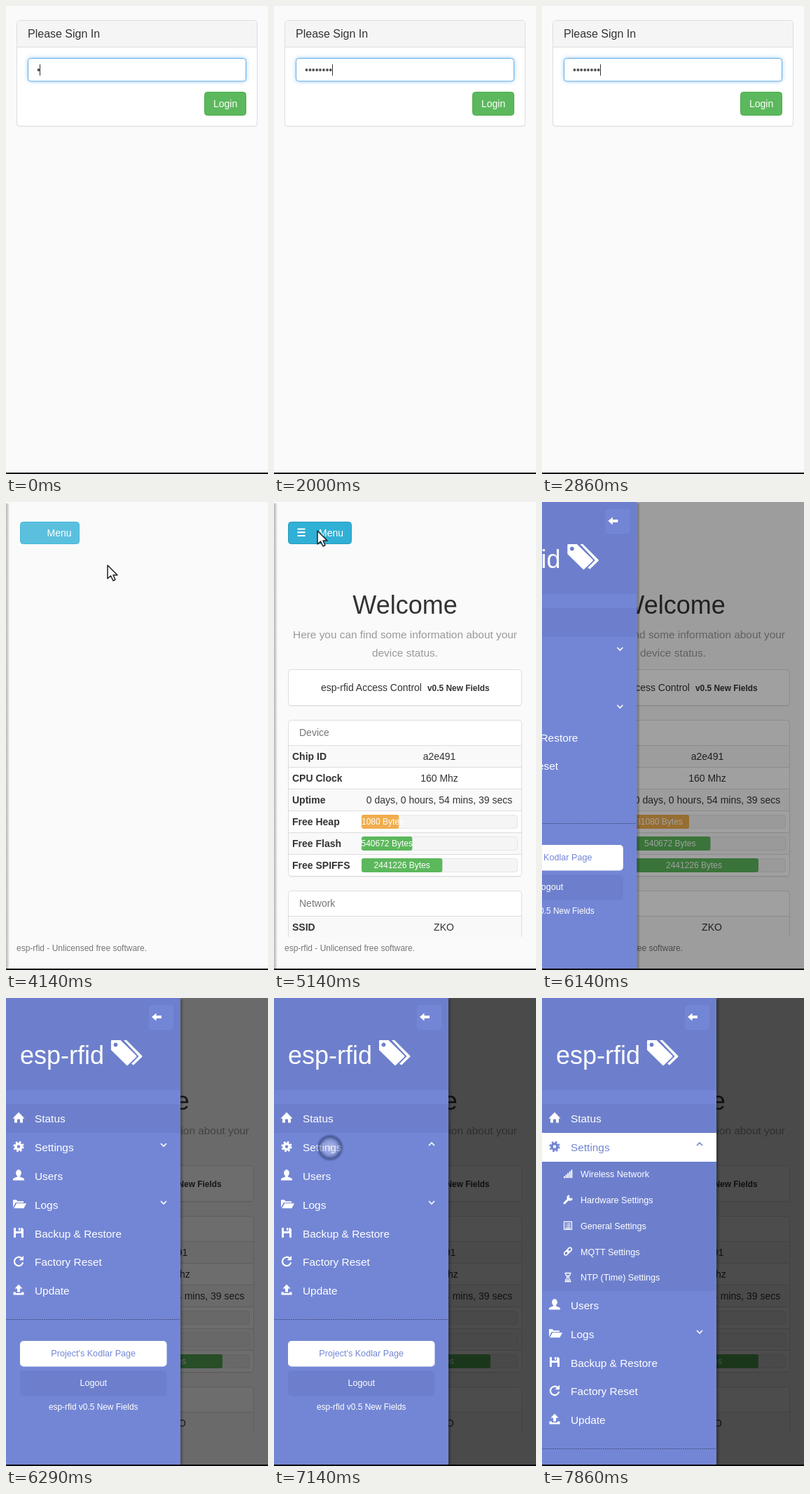
Recreate the animation shown at these times as an HTML page. Size 374 by 666 pixels, loop 8 s.

```html
<!DOCTYPE html>
<html lang="en">
<head>
<meta charset="utf-8">
<title>Device panel</title>
<style>
html, body { margin: 0; width: 100%; height: 100%; overflow: hidden; background: #fafafa; }
svg { display: block; }
text { font-family: "Liberation Sans", Arial, sans-serif; white-space: pre; }
</style>
</head>
<body>
<svg id="stage" width="374" height="666" viewBox="0 0 374 666"></svg>
<script>
const LOOP = 8000, FPS = 7;
const BLUE = '#7386d5', DEEP = '#6d7fcc', GREEN = '#5cb85c';
const SIDE_W = 249, SUB_H = 184;

const text = (x, y, size, str, fill = '#333', extra = '') =>
  `<text x="${x}" y="${y}" font-size="${size}" fill="${fill}" ${extra}>${str}</text>`;
const mid = (x, y, size, str, fill, extra = '') =>
  text(x, y, size, str, fill, 'text-anchor="middle" ' + extra);
const rect = (x, y, w, h, fill, extra = '') =>
  `<rect x="${x}" y="${y}" width="${w}" height="${h}" fill="${fill}" ${extra}/>`;
const path = (d, extra = '') => `<path d="${d}" ${extra}/>`;
const line = (d, w, extra = '') =>
  path(d, `fill="none" stroke="currentColor" stroke-width="${w}" ${extra}`);
const at = (x, y, body, extra = '') => `<g transform="translate(${x} ${y})" ${extra}>${body}</g>`;
const BOLD = 'font-weight="bold"';

// Icons are drawn around their own centre in the current colour.
const icons = {
  home: path('M-8.5 1 L0 -8 L8.5 1 H6 V7 H2 V2 H-2 V7 H-6 V1Z'),
  gear: '<circle r="4" fill="none" stroke="currentColor" stroke-width="3.6"/>' +
    '<circle r="6.4" fill="none" stroke="currentColor" stroke-width="2.6" stroke-dasharray="2.6 2.43"/>',
  user: '<ellipse cy="-3.5" rx="3.9" ry="4.6"/>' +
    path('M-8 7 V5 Q-7 3.5 -2 2 V0 H2 V2 Q7 3.5 8 5 V7Z'),
  folder: path('M-8 5 V-6 H-3 L-1.5 -4 H7 V-2 H-4.5Z M-6.8 6 L-3 -1 H11 L7.4 6Z'),
  save: path('M-7 -7 H-4 V-2 H3 V-7 H5 L7 -5 V7 H4 V1 H-4 V7 H-7Z M0 -7 H2 V-3 H0Z'),
  redo: line('M4.6 -4.2 A6.2 6.2 0 1 0 6.2 1.5', 2.2) + path('M7 -8 V-1.5 H0.8Z'),
  upload: path('M0 -8 L5.5 -2 H2 V3 H-2 V-2 H-5.5Z M-7.5 3 H-4 V4.5 H4 V3 H7.5 V7 H-7.5Z'),
  signal: [0, 1, 2, 3, 4].map(i => rect(-6 + i * 2.6, 3.5 - i * 2.3, 1.9, 2.5 + i * 2.3, 'currentColor')).join(''),
  wrench: line('M-5 5 L2 -2', 3, 'stroke-linecap="round"') +
    line('M5.6 -2.2 A3 3 0 1 1 2.2 -5.6', 2.4),
  list: line('M-5.5 -5.5 H5.5 V5.5 H-5.5Z', 1.2) +
    line('M-3.6 -2.8 H-2.4 M-1.4 -2.8 H3.8 M-3.6 -.4 H-2.4 M-1.4 -.4 H3.8 M-3.6 2 H-2.4 M-1.4 2 H3.8 M-3.6 4 H3.8', 1.2),
  link: `<g transform="rotate(-45)" fill="none" stroke="currentColor" stroke-width="1.7">
    <rect x="-6.6" y="-2.3" width="7.6" height="4.6" rx="2.3"/>
    <rect x="-1" y="-2.3" width="7.6" height="4.6" rx="2.3"/></g>`,
  glass: line('M-4.5 -6 H4.5 M-4.5 6 H4.5', 1.5) +
    line('M-3.2 -6 V-3.5 L-.6 0 L-3.2 3.5 V6 M3.2 -6 V-3.5 L.6 0 L3.2 3.5 V6', 1.2) +
    path('M-2.4 5 L0 2 L2.4 5Z M-1.8 -3 H1.8 L0 -.6Z')
};

const chevron = (y, up) =>
  line(up ? `M221 ${y + 2} L225 ${y - 2} L229 ${y + 2}` : `M221 ${y - 2} L225 ${y + 2} L229 ${y - 2}`, 1.6);
const item = (y, icon, label) =>
  at(18, y - 1, icons[icon], 'fill="currentColor"') + text(41, y + 5.5, 15.4, label, 'currentColor');
const subItem = (y, icon, label) =>
  at(37, y - .5, icons[icon], 'fill="currentColor"') + text(55, y + 4.5, 12.6, label, '#fff');

const login = `
  ${rect(15.5, 21.5, 343, 150.5, '#000', 'rx="4" opacity=".06"')}
  ${rect(15.5, 20.5, 343, 150.5, '#fff', 'rx="4" stroke="#ddd"')}
  ${path('M16 58 V24 Q16 21 19 21 H355 Q358 21 358 24 V58Z', 'fill="#f5f5f5"')}
  ${rect(16, 58, 342, 1, '#ddd')}
  ${text(31, 45, 16, 'Please Sign In')}
  ${rect(31.5, 74.5, 311, 32.5, '#66afe9', 'rx="4" filter="url(#glow)" opacity=".75"')}
  ${rect(31.5, 74.5, 311, 32.5, '#fff', 'rx="4" stroke="#66afe9"')}
  ${text(44, 95.5, 14, '', '#555', 'id="dots"')}
  ${rect(0, 83, 1, 16, '#333', 'id="caret"')}
  ${rect(283.5, 122.5, 59, 33, GREEN, 'rx="4" stroke="#4cae4c"')}
  ${text(296, 144, 14, 'Login', '#fff')}`;

const panel = (y, h) => rect(20.5, y + .5, 333, h, '#fff', 'rx="4" stroke="#ddd"') +
  rect(22, y + h + 1, 330, 1, '#000', 'opacity=".05"');
const rowAt = (y, i, label, value, cx = 236) =>
  (i % 2 ? '' : rect(21, y, 332, 31, '#f9f9f9')) + rect(21, y, 332, 1, '#ddd') +
  text(26, y + 21, 14, label, '#333', BOLD) + mid(cx, y + 21, 14, value, '#333');

const bars = [
  { label: 'Free Heap', value: '31080 Bytes', w: 85, fill: '#f0ad4e' },
  { label: 'Free Flash', value: '540672 Bytes', w: 115.5, fill: GREEN },
  { label: 'Free SPIFFS', value: '2441226 Bytes', w: 184, fill: GREEN }
];
const barRow = (b, i) => {
  const y = 439 + i * 31;
  return rowAt(y, i + 3, b.label, '') +
    rect(125, y + 6, 223, 20, '#f5f5f5', 'rx="4"') +
    rect(125.5, y + 6.5, 222, 19, 'none', 'rx="4" stroke="#e6e6e6"') +
    `<svg x="125" y="${y + 6}" width="223" height="20">` +
    rect(0, 0, 0, 20, b.fill, `rx="3" id="bar${i}"`) +
    mid(0, 14, 12, b.value, '#fff', `id="cap${i}"`) + '</svg>';
};

const content = `
  ${mid(187, 159, 36, 'Welcome', '#333')}
  ${mid(187, 194, 15.4, 'Here you can find some information about your', '#999')}
  ${mid(187, 220, 15.4, 'device status.', '#999')}
  ${panel(238, 51)}
  ${text(67, 269, 14, 'esp-rfid Access Control')}
  ${text(219, 269, 11.9, 'v0.5 New Fields', '#333', BOLD)}
  ${panel(310, 222)}
  ${text(36, 333, 14, 'Device', '#777')}
  ${rowAt(346, 0, 'Chip ID', 'a2e491')}
  ${rowAt(377, 1, 'CPU Clock', '160 Mhz')}
  ${rowAt(408, 2, 'Uptime', '0 days, 0 hours, 54 mins, 39 secs')}
  ${bars.map(barRow).join('')}
  ${panel(553, 200)}
  ${text(36, 576, 14, 'Network', '#777')}
  ${rowAt(589, 0, 'SSID', 'ZKO', 242.5)}`;

const menu = `
  ${rect(20.5, 28.5, 84, 31, '#5bc0de', 'rx="4" stroke="#46b8da" id="menuBox"')}
  ${rect(0, 0, 0, 0, 'none')}
  <path id="burger" d="M33.5 38.5 H44.5 M33.5 43.2 H44.5 M33.5 48 H44.5" stroke="#fff" stroke-width="2.2"/>
  ${text(58.5, 49, 14, 'Menu', '#fff', 'id="menuText"')}`;

const tags = path('M150 61 Q150 60 151 60 H163.5 L186 82 Q187 83 186 84 L174 95.5 Q173 96.5 172 95.5 L150 74Z ' +
    'M156.5 63.5 a3 3 0 1 0 .01 0Z', 'fill="#fff" fill-rule="evenodd"') +
  path('M168 60 H172 L194 82 Q195 83 194 84 L182 95.5 L179 93.5 L189.5 83Z', 'fill="#fff"');

const sidebar = `
  ${rect(SIDE_W, 2, 5, 662, 'url(#edge)')}
  ${rect(0, 0, SIDE_W, 664, BLUE)}
  ${rect(0, 0, SIDE_W, 131, DEEP)}
  ${rect(204, 10, 35, 35, BLUE, 'rx="4"')}
  ${path('M208 27 L214.5 21.5 V25 H222 V29 H214.5 V32.5Z', 'fill="#fff"')}
  ${text(20, 94, 36, 'esp-rfid', '#fff')}${tags}
  ${rect(0, 151, SIDE_W, 41, DEEP)}
  <g color="#fff">${item(171.5, 'home', 'Status')}</g>
  ${rect(0, 192, SIDE_W, 41, '#fff', 'id="hover"')}
  <g id="settings">${item(212.5, 'gear', 'Settings')}
    <g id="down">${chevron(209)}</g><g id="up">${chevron(208, true)}</g></g>
  <svg id="sub" x="0" y="233" width="${SIDE_W}" height="0" color="#fff">
    ${rect(0, 0, SIDE_W, SUB_H, DEEP)}
    ${[['signal', 'Wireless Network'], ['wrench', 'Hardware Settings'], ['list', 'General Settings'],
       ['link', 'MQTT Settings'], ['glass', 'NTP (Time) Settings']]
      .map(([icon, label], i) => subItem(17.7 + i * 36.8, icon, label)).join('')}
  </svg>
  <g id="lower" color="#fff">
    ${[['user', 'Users'], ['folder', 'Logs'], ['save', 'Backup &amp; Restore'],
       ['redo', 'Factory Reset'], ['upload', 'Update']]
      .map(([icon, label], i) => item(253.4 + i * 40.8, icon, label)).join('')}
    ${chevron(291)}
    ${path('M0 457.5 H249', 'stroke="#47548b" stroke-dasharray="2 1"')}
    ${rect(20, 488, 209.5, 36.5, '#fff', 'rx="5"')}
    ${mid(124.7, 510.3, 12.6, "Project's Kodlar Page", BLUE)}
    ${rect(20, 530, 209.5, 36.5, DEEP, 'rx="5"')}
    ${mid(124.7, 551.8, 12.6, 'Logout', '#fff')}
    ${mid(124.7, 586, 11.9, 'esp-rfid v0.5 New Fields', '#fff')}
  </g>`;

document.getElementById('stage').innerHTML = `
  <defs>
    <filter id="glow" x="-5%" y="-40%" width="110%" height="180%"><feGaussianBlur stdDeviation="3"/></filter>
    <clipPath id="body">${rect(0, 0, 374, 619, '#000')}</clipPath>
    <linearGradient id="edge">
      <stop offset="0" stop-opacity=".27"/><stop offset=".45" stop-opacity=".17"/><stop offset="1" stop-opacity="0"/>
    </linearGradient>
    <radialGradient id="press">
      <stop offset="0" stop-color="#fff" stop-opacity=".45"/>
      <stop offset=".45" stop-color="#c3cdee" stop-opacity=".35"/>
      <stop offset=".78" stop-color="#2b3a70" stop-opacity=".6"/>
      <stop offset="1" stop-color="#2b3a70" stop-opacity="0"/>
    </radialGradient>
  </defs>
  ${rect(0, 0, 374, 666, '#fafafa')}
  <g id="login">${login}</g>
  <g id="home">
    <g id="content" clip-path="url(#body)">${content}</g>
    ${text(15, 639, 12, 'esp-rfid - Unlicensed free software.', '#777')}
    ${menu}
    ${rect(0, 0, 374, 664, '#000', 'id="shade"')}
    <g id="side">${sidebar}</g>
    <circle id="touch" fill="url(#press)"/>
    <path id="arrow" d="M0 0 V19 L4.5 15 L8 22 L11 20.5 L8 14 H14Z" fill="#fff" stroke="#222" stroke-width="1.5" stroke-linejoin="round"/>
  </g>
  ${rect(0, 664, 374, 2, '#000')}`;

const $ = id => document.getElementById(id);
const set = (id, attrs) => { for (const k in attrs) $(id).setAttribute(k, attrs[k]); };
const show = (id, on) => $(id).setAttribute('display', on ? 'inline' : 'none');
const span = (t, a, b) => Math.min(1, Math.max(0, (t - a) / (b - a)));
const smooth = u => u * u * (3 - 2 * u);
const easeOut = (u, p) => 1 - Math.pow(1 - u, p);

function drawLogin(step) {
  const n = Math.min(8, 1 + Math.min(step, 5) + Math.max(0, step - 6));
  $('dots').textContent = '•'.repeat(n);
  set('caret', { x: Math.floor(44 + 4.9 * n) });
}

function drawHome(t) {
  const ready = t >= 4420, hot = t >= 4560, pressed = t >= 5700;
  show('burger', ready);
  set('menuText', { x: ready ? 64 : 58.5 });
  set('menuBox', {
    width: ready ? 90 : 84,
    fill: pressed ? '#2d93c6' : hot ? '#31b0d5' : '#5bc0de',
    stroke: pressed ? '#2379a8' : hot ? '#269abc' : '#46b8da'
  });

  show('content', t >= 4850);
  const grow = smooth(span(t, 4780, 5400));
  bars.forEach((b, i) => {
    set('bar' + i, { width: b.w * grow });
    set('cap' + i, { x: b.w * grow / 2 });
  });

  const move = smooth(span(t, 4290, 4570));
  show('arrow', !pressed);
  set('arrow', { transform: `translate(${145 - 83 * move} ${90 - 49 * move})` });

  const first = t >= 5700 && t < 6130, second = t >= 6990 && t < 7280;
  show('touch', first || second);
  set('touch', first ? { cx: 65, cy: 46.5, r: 7.5 } : { cx: 80, cy: 213, r: 20 });

  set('shade', { opacity: .7 * easeOut(span(t, 5980, 6580), 2.4) });
  const slide = smooth(span(t, 6000, 6270));
  set('side', { transform: `translate(${-SIDE_W * (1 - slide)} 0)` });

  const open = t >= 7130, lit = t >= 7280;
  show('down', !open);
  show('up', open);
  show('hover', lit);
  set('settings', { color: lit ? BLUE : '#fff' });
  const h = SUB_H * smooth(span(t, 7150, 7520));
  set('sub', { height: h });
  show('sub', h > 0);
  set('lower', { transform: `translate(0 ${h})` });
}

function draw(ms) {
  const step = Math.floor(ms % LOOP * FPS / 1000 + .05);
  const t = step * 1000 / FPS;
  const home = t >= 4130;
  show('login', !home);
  show('home', home);
  if (home) drawHome(t); else drawLogin(step);
}

const start = performance.now();
function tick() {
  draw(performance.now() - start);
  requestAnimationFrame(tick);
}
tick();
</script>
</body>
</html>
```
